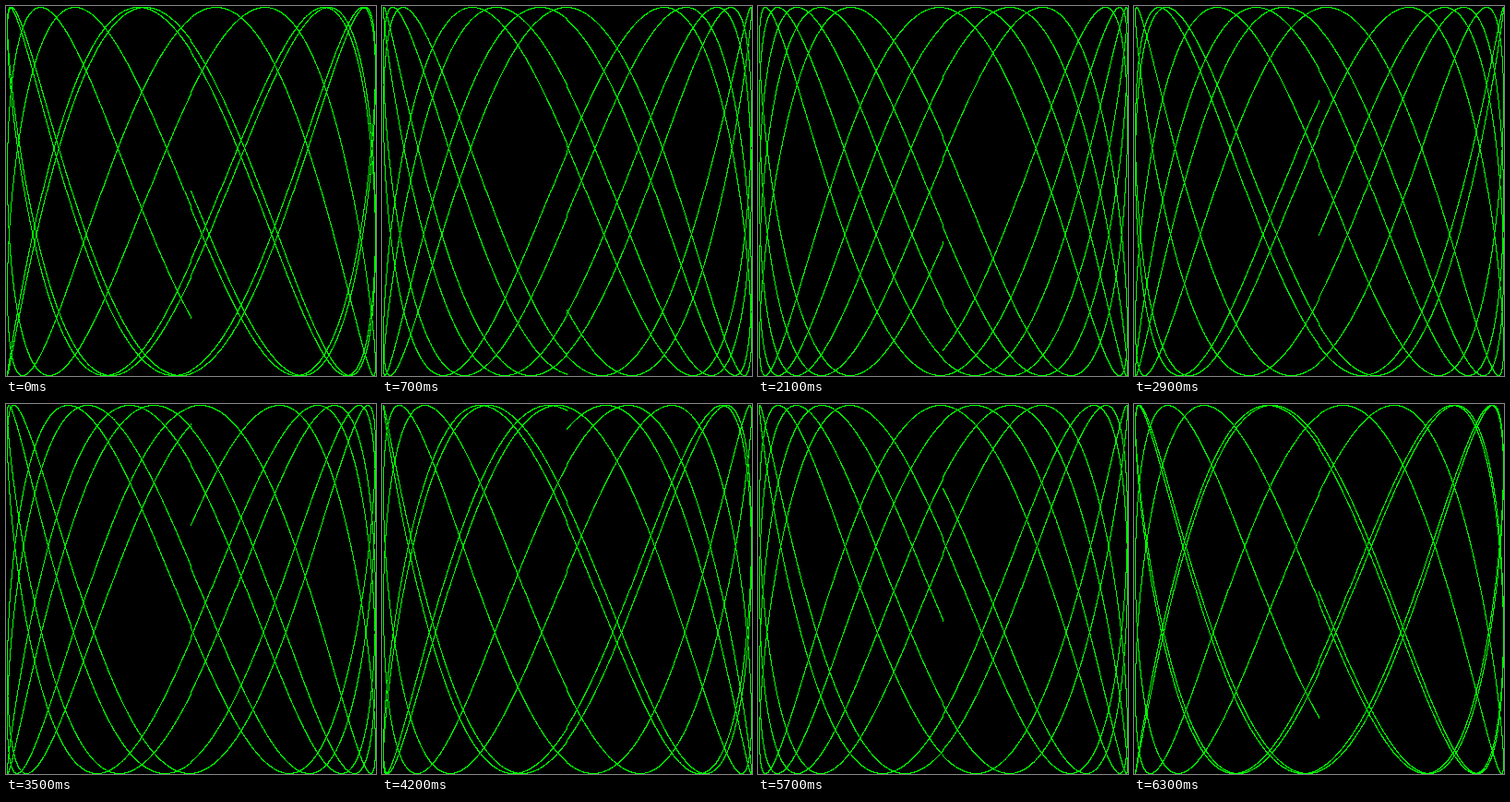
Write an HTML page with a canvas that moves like this. It is 401 by 401 pixels and loops after 6400 ms.

```html
<!DOCTYPE html>
<html lang="en">
<head>
<meta charset="utf-8">
<title>Lissajous</title>
<style>
  html, body { margin: 0; width: 100%; height: 100%; overflow: hidden; background: #000; }
  canvas { display: block; }
</style>
</head>
<body>
<canvas id="stage" width="401" height="401"></canvas>
<script>
const RADIUS = 200, SIDE = 2 * RADIUS + 1;
const CYCLES = 5, STEP = 0.001, FREQUENCY = 2.42429;
const FRAMES = 64, FRAME_MS = 100, PHASE_STEP = 0.1;

const ctx = document.getElementById('stage').getContext('2d');
const image = ctx.createImageData(SIDE, SIDE);
const pixels = new Uint32Array(image.data.buffer);
const BLACK = 0xff000000, GREEN = 0xff00ff00;

// Truncating toward zero gives the slight kink at the centre lines.
const toPixel = v => RADIUS + Math.trunc(v * RADIUS + 0.5);

function draw(phase) {
  pixels.fill(BLACK);
  for (let t = 0; t < CYCLES * 2 * Math.PI; t += STEP) {
    const x = toPixel(Math.sin(t));
    const y = toPixel(Math.sin(t * FREQUENCY + phase));
    pixels[y * SIDE + x] = GREEN;
  }
  ctx.putImageData(image, 0, 0);
}

const start = performance.now();
let shown = -1;

function tick() {
  const frame = Math.floor((performance.now() - start) / FRAME_MS) % FRAMES;
  if (frame !== shown) {
    draw(frame * PHASE_STEP);
    shown = frame;
  }
  requestAnimationFrame(tick);
}
tick();
</script>
</body>
</html>
```
